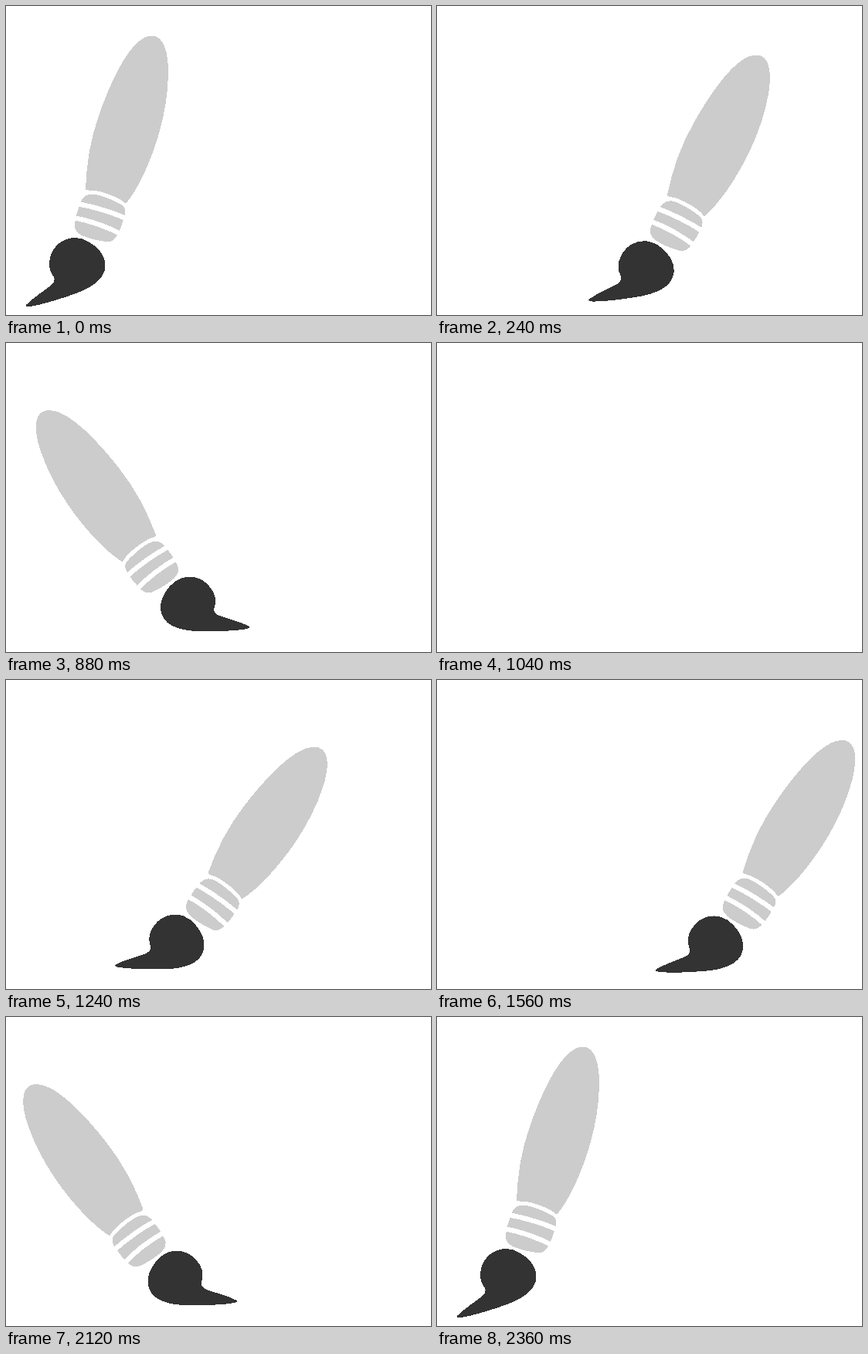
An HTML page that plays this animation: 550x400 px, repeating every 2400 ms.

```html
<!DOCTYPE html>
<html lang="en">
<head>
<meta charset="utf-8">
<title>Paint brush</title>
<style>
  html, body { margin: 0; width: 100%; height: 100%; overflow: hidden; background: #fff; }
  svg { display: block; width: 100%; height: 100%; }
</style>
</head>
<body>
<svg viewBox="0 0 550 400" shape-rendering="crispEdges">
  <g id="brush">
    <path fill="#ccc" d="M103 237 C104 205 109 172 121 139 C136 97 162 38.5 189 38.5
      C205 38.5 210 63 210 85 C210 112 205.5 138 198.5 163 C189 197 172 236 155 256
      C147 247 121 239 112 238.5 Q104 239 103 237Z"/>
    <path fill="#ccc" d="M112 243.5 C122 244 141 252 150 257.5 Q155 261 154 269
      C152 278 149 287 145 295 C141 303 136 306 129 305 C118 303.5 107 301 98 297
      C91 293 88 289 89 281 C90 272 93 264 96 255 C100 246 104 243.5 112 243.5Z"/>
    <g fill="none" stroke="#fff" stroke-width="6.4">
      <path d="M90 255.5 Q126 262 159 276.5"/>
      <path d="M85 273.5 Q121 280 152 297"/>
    </g>
    <path fill="#333" d="M90 300 C103 300 115 310 121 316.5 C126 323 128.5 329 128.5 336.5
      C128.5 354 108 365.5 92 371.5 C70 379.5 45 387 31 389 Q24 390 26.5 386.5
      C35 377.5 52 367 59 361 Q64 356 62 351 C55 342 55 334 57 326
      C61 310 74 300 90 300Z"/>
  </g>
</svg>
<script>
  const LOOP = 2400, TICK = 40, DROP = 80, RISE = 120, DEPTH = 370;
  const brush = document.getElementById('brush');

  // Poses: pivot x, pivot y, turn in degrees
  const upright = [129, 246.5, 0];
  const leanEnd = [418.4, 264.7, 14.6];
  const leanStart = [249.5, 267.2, 18.9];
  const backStart = [304.5, 266.2, 18.5];
  const backEnd = [139.5, 266.2, 18.5];

  const strokes = [
    { start: 0, end: 360, from: upright, to: leanEnd, flip: 1 },
    { start: 560, end: 960, from: backStart, to: backEnd, flip: -1 },
    { start: 1160, end: 1560, from: leanStart, to: leanEnd, flip: 1 },
    { start: 1760, end: 2160, from: backStart, to: backEnd, flip: -1 },
    { start: 2360, end: 2400, from: upright, to: upright, flip: 1 }
  ];

  const clamp = v => Math.min(1, Math.max(0, v));

  function draw(time) {
    const t = Math.floor(time % LOOP / TICK) * TICK;
    const s = strokes.find(k => t < k.end + DROP);
    const p = clamp((t - s.start) / (s.end - s.start));
    const [x, y, turn] = s.from.map((v, i) => v + (s.to[i] - v) * p);
    // The brush rises before each stroke and sinks after it
    const sink = clamp((s.start - t) / RISE) + clamp((t - s.end) / DROP);
    brush.setAttribute('transform',
      `translate(${x} ${y + sink * DEPTH}) scale(${s.flip} 1) rotate(${turn}) translate(-129 -246.5)`);
  }

  const begin = performance.now();
  function frame() {
    draw(performance.now() - begin);
    requestAnimationFrame(frame);
  }
  draw(0);
  requestAnimationFrame(frame);
</script>
</body>
</html>
```
